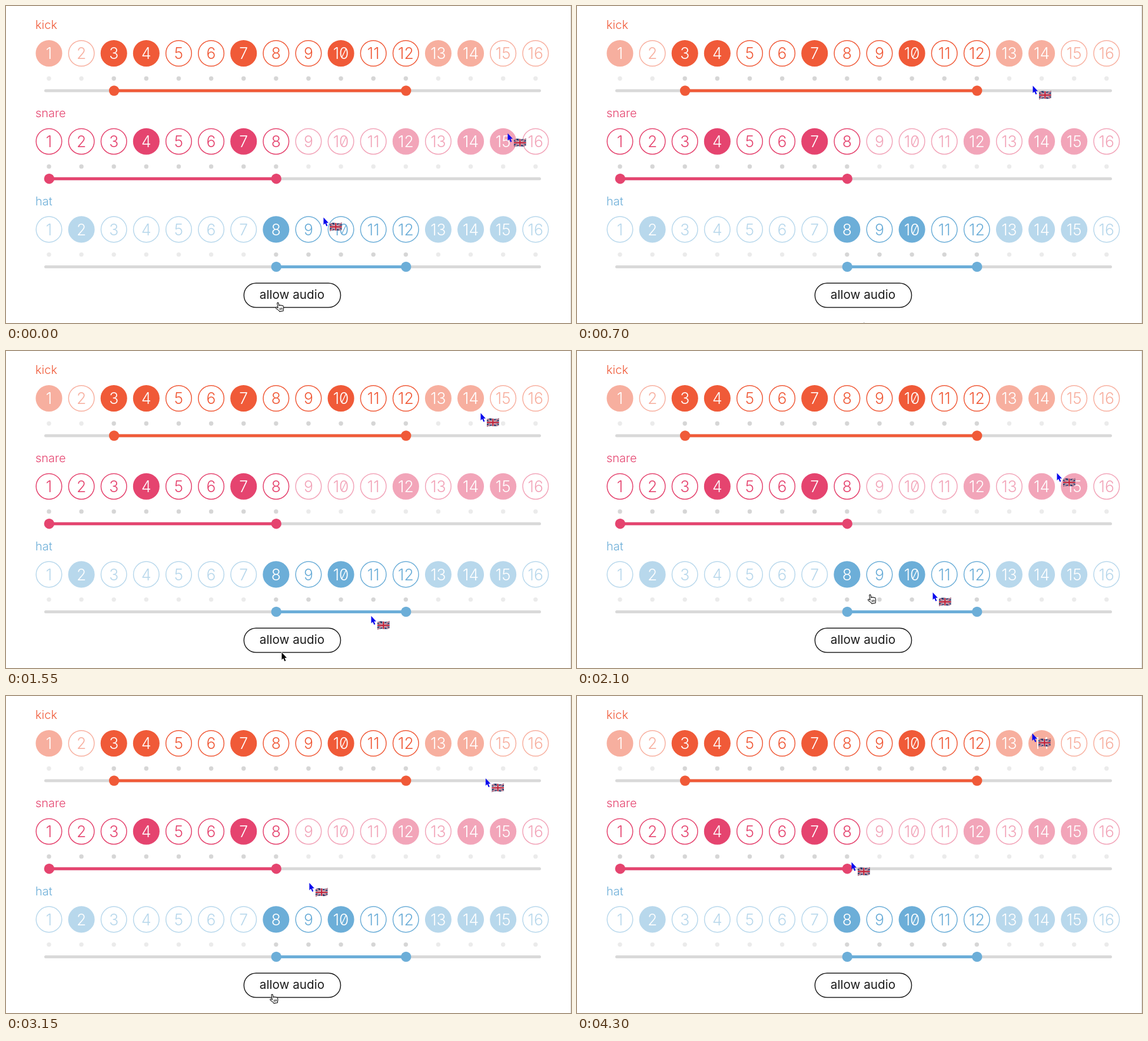
These frames come from a looping animation (960 by 539 pixels, 4.35 s). An HTML page:

```html
<!DOCTYPE html>
<html lang="en">
<head>
<meta charset="utf-8">
<title>Step sequencer</title>
<style>
  html, body { margin: 0; width: 100%; height: 100%; overflow: hidden; background: #fff; }
  svg { display: block; width: 960px; height: 539px; }
  text { font-family: Inter, "Open Sans", sans-serif; font-weight: 300; }
  .label { font-size: 20px; }
  .num { font-size: 26.5px; text-anchor: middle; font-feature-settings: "zero"; }
  .button { font-size: 20.7px; font-weight: 400; text-anchor: middle; fill: #1c1c1c; }
</style>
</head>
<body>
<svg viewBox="0 0 960 539" xmlns="http://www.w3.org/2000/svg">
  <defs>
    <path id="arrow" d="M.5 .5V13L3.200 10.500 5.400 15.500 7.400 14.600 5.300 9.700H9Z"/>
    <clipPath id="wave">
      <path d="M0 2.500Q5 0 10.500 1.500T21 .5V13Q16 15 10.500 14T0 15.500Z"/>
    </clipPath>
    <g id="flag" clip-path="url(#wave)">
      <path fill="#232f63" d="M0 0H21V16H0Z"/>
      <path stroke="#dcd6df" stroke-width="2.400" d="M0 1.500 21 14.500M0 15 21 1"/>
      <path stroke="#b92b42" stroke-width="1" d="M0 1.500 21 14.500M0 15 21 1"/>
      <path stroke="#e4dde3" stroke-width="4" d="M10.500 0V16M0 8H21"/>
      <path stroke="#c0253c" stroke-width="2.400" d="M10.500 0V16M0 8H21"/>
    </g>
    <g id="guest">
      <use href="#arrow" fill="#0808ee"/>
      <use href="#flag" x="10.800" y="8.500"/>
    </g>
    <g id="hand" transform="rotate(-10) translate(-6.500 -.8)" stroke="#111" stroke-width="1.1" stroke-linejoin="round">
      <path fill="#fff" d="M4 10V2.200C4 .500 6.400 .500 6.400 2.200V6.500C6.600 5.300 8.800 5.300 8.900 6.800 9.200 5.900 11.200 6 11.200 7.500 11.600 6.800 13.400 7 13.400 8.600V11C13.400 13 12.200 14 12 16.500H5.600C5.300 14 2.500 12.500 .8 10-.2 8.400 1.600 7.500 2.800 8.600Z"/>
      <path fill="none" stroke-width=".9" d="M6.800 10.500V14M8.800 10.500V14M10.800 10.500V14"/>
    </g>
  </defs>
  <g id="board"></g>
  <rect x="404.300" y="471.300" width="164.200" height="41.200" rx="20.600" fill="#fff" stroke="#1c1c1c" stroke-width="1.500"/>
  <text class="button" x="486" y="497.500">allow audio</text>
  <path d="M959.500 0V539" stroke="#dcdcdc"/>
  <use id="left" href="#guest"/>
  <use id="right" href="#guest"/>
  <g id="own">
    <use id="ownHand" href="#hand"/>
    <use id="ownArrow" href="#arrow" fill="#000" stroke="#fff" stroke-width="1.200" paint-order="stroke"/>
  </g>
</svg>
<script>
const LOOP = 4350, STEP = 50, TOGGLE = 300, OWN_GONE = 3900;
const $ = id => document.getElementById(id);

const tracks = [
  { name: "kick", color: "#f05a38", beat: "x.xx..x..x..xx..", from: 3, to: 12 },
  { name: "snare", color: "#e5446f", beat: "...x..x....x.xx.", from: 1, to: 8 },
  { name: "hat", color: "#6caed8", beat: ".x.....x....xxx.", from: 8, to: 12 }
];
const stepX = n => 73 + 55.12 * (n - 1);

function add(parent, tag, attrs, text) {
  const el = document.createElementNS("http://www.w3.org/2000/svg", tag);
  for (const key in attrs) el.setAttribute(key, attrs[key]);
  if (text !== undefined) el.textContent = text;
  parent.append(el);
  return el;
}

// Draws one step and returns a function that switches it on or off.
function buildStep(row, track, n) {
  const x = stepX(n), active = n >= track.from && n <= track.to;
  const g = add(row, "g", { opacity: active ? 1 : 0.48 });
  const circle = add(g, "circle", { cx: x, cy: 80.5, r: 21.8, stroke: track.color, "stroke-width": 1.5 });
  const num = add(g, "text", { class: "num", x, y: 90.2 }, n);
  add(row, "circle", { cx: x, cy: 123.2, r: 3.7, fill: active ? "#d6d6d6" : "#ebebeb" });
  return on => {
    circle.setAttribute("fill", on ? track.color : "#fff");
    num.setAttribute("fill", on ? "#fff" : track.color);
  };
}

function buildTrack(track, i) {
  const row = add($("board"), "g", { transform: `translate(0 ${i * 149.7})` });
  add(row, "text", { class: "label", x: 50, y: 39.3, fill: track.color }, track.name);
  track.paint = [...track.beat].map((mark, k) => {
    const paint = buildStep(row, track, k + 1);
    paint(mark === "x");
    return paint;
  });
  const a = stepX(track.from) + 0.4, b = stepX(track.to) + 0.4;
  const line = { fill: "none", "stroke-width": 5 };
  add(row, "path", { ...line, d: "M67.5 144H906.5", stroke: "#d9d9d9", "stroke-linecap": "round" });
  add(row, "path", { ...line, d: `M${a} 144H${b}`, stroke: track.color });
  for (const cx of [a, b]) add(row, "circle", { cx, cy: 144, r: 8.7, fill: track.color });
}
tracks.forEach(buildTrack);

// Turning points of each pointer: [time, x, y]
const paths = {
  right: [
    [0, 852, 216], [700, 774, 135], [950, 783, 90], [1300, 822, 129], [1550, 806, 105],
    [1750, 815, 86], [2100, 815, 207], [2650, 786, 238], [2900, 815, 116], [3600, 811, 197],
    [3850, 799, 78], [4300, 773, 63]
  ],
  left: [
    [0, 539, 359], [350, 543, 362], [700, 575, 545], [1200, 620, 545], [1550, 620, 450],
    [2100, 604, 410], [2650, 605, 429], [3600, 438, 222], [4300, 466, 282]
  ],
  own: [
    [0, 463, 504], [550, 486, 502], [700, 487, 537.5], [1400, 478, 542], [1550, 468, 512],
    [2100, 499, 414], [2650, 497, 413], [2800, 456, 507], [3300, 453, 507], [3600, 474, 446],
    [3900, 472, 462]
  ]
};

// Smooth curve through the points that never overshoots them.
function curve(path, axis, t) {
  const slope = i => path[i] && path[i + 1]
    ? (path[i + 1][axis] - path[i][axis]) / (path[i + 1][0] - path[i][0])
    : 0;
  const tangent = i => {
    const a = slope(i - 1), b = slope(i);
    return a * b > 0 ? 2 * a * b / (a + b) : 0;
  };
  const i = path.findLastIndex(p => p[0] <= t);
  if (i === path.length - 1) return path[i][axis];
  const span = path[i + 1][0] - path[i][0], k = (t - path[i][0]) / span;
  const ease = k * k * (3 - 2 * k);
  return path[i][axis] + (path[i + 1][axis] - path[i][axis]) * ease
    + span * k * (1 - k) * ((1 - k) * tangent(i) - k * tangent(i + 1));
}

const show = (id, on) => $(id).setAttribute("display", on ? "inline" : "none");

function draw(time) {
  const t = Math.floor((time % LOOP) / STEP) * STEP;
  for (const id in paths) {
    const x = curve(paths[id], 1, t), y = curve(paths[id], 2, t);
    $(id).setAttribute("transform", `translate(${x} ${y})`);
  }
  const y = curve(paths.own, 2, t);
  const clickable = y < 435 || (y > 471 && y < 511);
  show("own", t < OWN_GONE);
  show("ownHand", clickable);
  show("ownArrow", !clickable);
  tracks[2].paint[9](t >= TOGGLE);
}

const start = performance.now();
function tick() {
  draw(performance.now() - start);
  requestAnimationFrame(tick);
}
tick();
</script>
</body>
</html>
```
